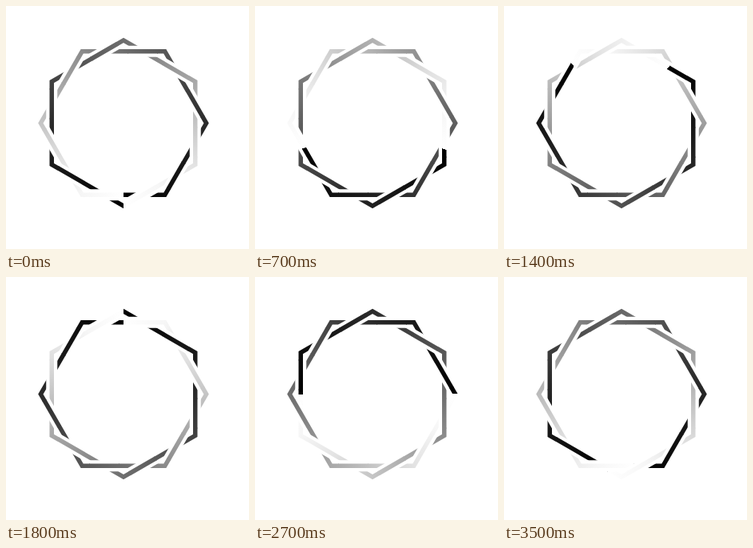
Write an HTML page with a canvas that moves like this. It is 304x304 px and loops after 3.6 s.

```html
<!DOCTYPE html>
<html lang="en">
<head>
<meta charset="utf-8">
<title>Interlaced hexagons</title>
<style>
html, body { margin: 0; width: 100%; height: 100%; overflow: hidden; background: #fff; }
canvas { display: block; width: 304px; height: 304px; }
</style>
</head>
<body>
<canvas id="stage" width="304" height="304"></canvas>
<script>
const ctx = document.getElementById('stage').getContext('2d');
const CX = 147, CY = 146.5;
const LINE = 5.5, HALO = 14;
const APOTHEM = 92.5 - LINE / 2;
const RADIUS = APOTHEM / Math.cos(Math.PI / 6);
const CROSS = APOTHEM / Math.cos(Math.PI / 12);
const STEP_MS = 100, STEPS = 36;
// angle behind the seam, grey level
const SHADES = [[0, 0], [60, 26], [90, 43], [180, 110], [240, 168],
                [270, 197], [300, 226], [330, 246], [360, 255]];

const rad = deg => deg * Math.PI / 180;
const polar = (r, deg) => [CX + r * Math.cos(rad(deg)), CY + r * Math.sin(rad(deg))];

function sweep(seam, clockwise) {
  const g = ctx.createConicGradient(rad(seam), CX, CY);
  const list = clockwise ? SHADES : [...SHADES].reverse();
  for (const [deg, v] of list) {
    g.addColorStop((clockwise ? deg : 360 - deg) / 360, `rgb(${v},${v},${v})`);
  }
  return g;
}

function hexagon(first, paint) {
  ctx.beginPath();
  for (let i = 0; i < 6; i++) ctx.lineTo(...polar(RADIUS, first + 60 * i));
  ctx.closePath();
  ctx.lineWidth = LINE;
  ctx.strokeStyle = paint;
  ctx.stroke();
}

function bar(angle, half, width, paint) {
  const [x, y] = polar(CROSS, angle);
  const dx = half * Math.cos(rad(angle + 75));
  const dy = half * Math.sin(rad(angle + 75));
  ctx.beginPath();
  ctx.moveTo(x - dx, y - dy);
  ctx.lineTo(x + dx, y + dy);
  ctx.lineWidth = width;
  ctx.strokeStyle = paint;
  ctx.stroke();
}

// passes one hexagon over the other at every second crossing
function weave(first, paint) {
  for (let i = 0; i < 6; i++) {
    const angle = first + 60 * i;
    bar(angle, 18, HALO, '#fff');
    bar(angle, 19, LINE, paint);
  }
}

function draw(step) {
  const pointed = sweep(90 - step * 10, true);
  const flat = sweep(90 + step * 10, false);
  ctx.fillStyle = '#fff';
  ctx.fillRect(0, 0, 304, 304);
  hexagon(-90, pointed);
  hexagon(-60, flat);
  weave(-105, pointed);
  weave(-75, flat);
}

const start = performance.now();
function tick() {
  const t = Math.max(0, performance.now() - start);
  draw(Math.floor(t / STEP_MS) % STEPS);
  requestAnimationFrame(tick);
}
tick();
</script>
</body>
</html>
```
